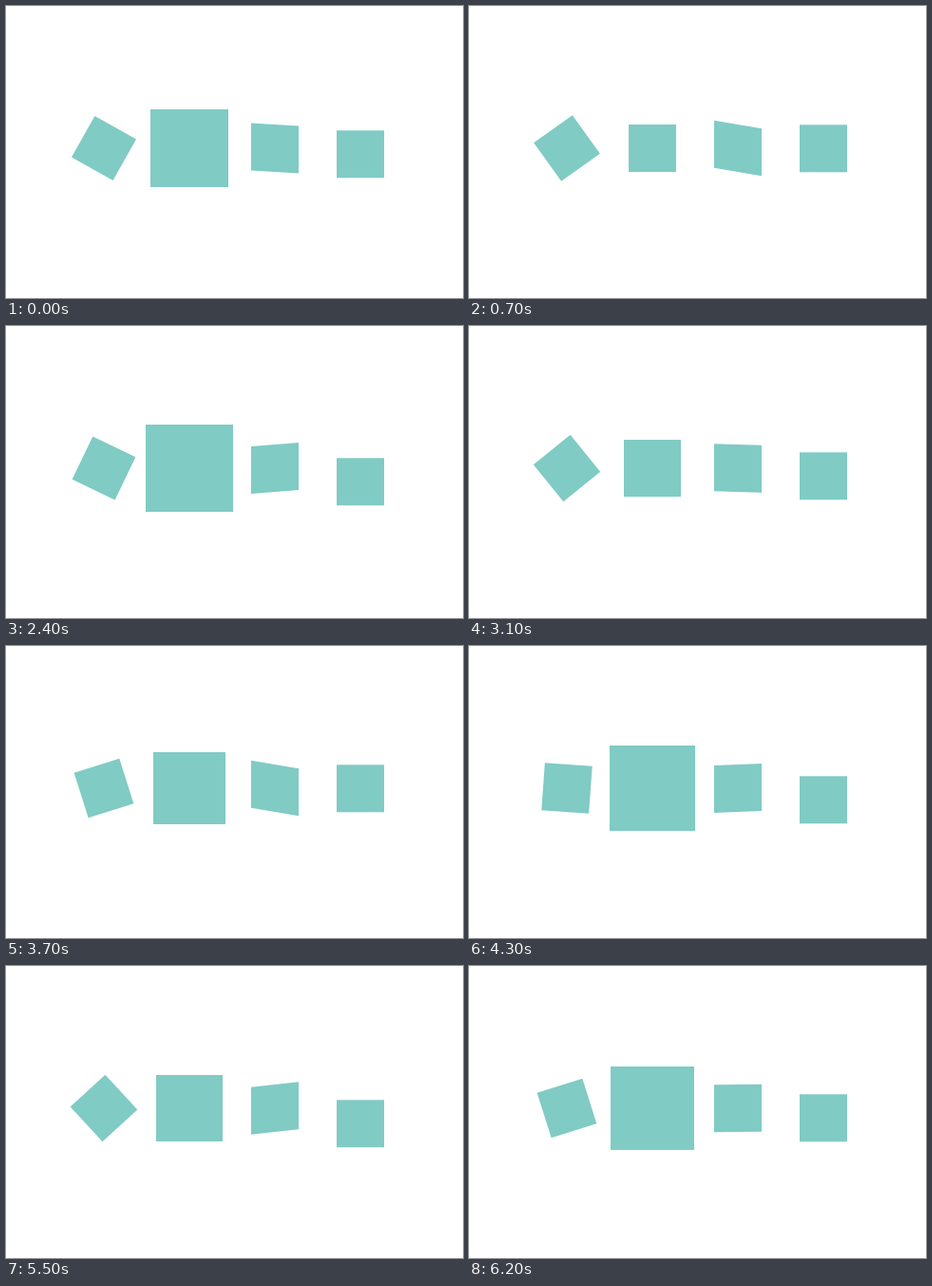
Recreate the animation shown at these times as an HTML page with a canvas. Size 481 px wide and 308 px high, loop 6300 ms.

```html
<!DOCTYPE html>
<html lang="en">
<head>
<meta charset="utf-8">
<title>Four transforms</title>
<style>
  html, body { margin: 0; width: 100%; height: 100%; overflow: hidden; background: #fff; }
  canvas { display: block; }
</style>
</head>
<body>
<canvas id="stage" width="481" height="308"></canvas>
<script>
const ctx = document.getElementById('stage').getContext('2d');
const LOOP = 6300, STEP = 100, OFFSET = 3315;
const SIZE = 50, MID_Y = 150;
const rad = deg => deg * Math.PI / 180;

// Each square repeats one linear transform; p runs from 0 to 1.
const squares = [
  { x: 103, period: 10000, draw: p => { ctx.rotate(rad(360 * p)); box(SIZE); } },
  { x: 193, period: 2000, draw: p => box(2 * Math.round(SIZE / 2 * (1 + p))) },
  { x: 283, period: 1000, draw: p => { ctx.transform(1, Math.tan(rad(10 - 20 * p)), 0, 1, 0, 0); box(SIZE); } },
  { x: 373, period: 1000, draw: p => { ctx.translate(0, 20 * p); box(SIZE); } }
];

function box(size) {
  ctx.fillRect(-size / 2, -size / 2, size, size);
}

function render(ms) {
  const t = Math.floor((ms % LOOP) / STEP) * STEP + OFFSET;
  ctx.fillStyle = '#fff';
  ctx.fillRect(0, 0, 481, 308);
  ctx.fillStyle = '#80cbc4';
  for (const { x, period, draw } of squares) {
    ctx.save();
    ctx.translate(x, MID_Y);
    draw((t % period) / period);
    ctx.restore();
  }
}

const start = performance.now();
function tick() {
  render(performance.now() - start);
  requestAnimationFrame(tick);
}
tick();
</script>
</body>
</html>
```
